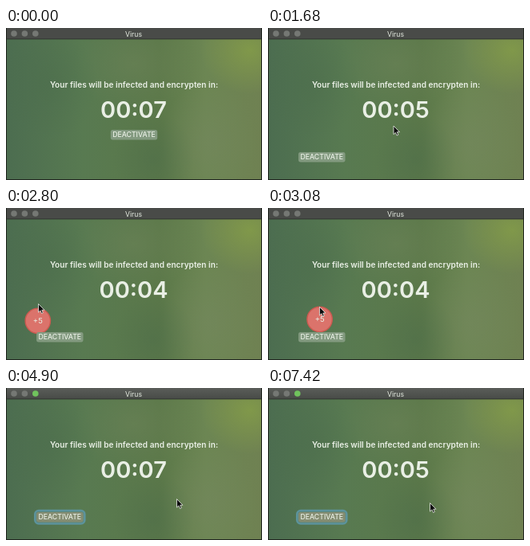
An HTML page that plays this animation: 320x191 px, repeating every 7.49 s.

```html
<!DOCTYPE html>
<html lang="en">
<head>
<meta charset="utf-8">
<title>Virus</title>
<style>
  html, body { margin: 0; width: 100%; height: 100%; overflow: hidden; background: #151a15; }
  svg { display: block; width: 100vw; height: 100vh; }
  text { font-family: Inter, "Open Sans", sans-serif; text-anchor: middle; fill: #e9efe5; }
</style>
</head>
<body>
<svg viewBox="0 0 320 191">
  <defs>
    <linearGradient id="base">
      <stop offset="0" stop-color="#4c6d50"/>
      <stop offset=".3" stop-color="#587a51"/>
      <stop offset=".6" stop-color="#5b7849"/>
      <stop offset=".78" stop-color="#6c8653"/>
      <stop offset="1" stop-color="#6f8152"/>
    </linearGradient>
    <linearGradient id="bar" x2="0" y2="1">
      <stop offset="0" stop-color="#5a5d59"/>
      <stop offset="1" stop-color="#484b47"/>
    </linearGradient>
    <radialGradient id="lime"><stop stop-color="#80984a"/><stop offset="1" stop-color="#80984a" stop-opacity="0"/></radialGradient>
    <radialGradient id="dark"><stop stop-color="#48694a"/><stop offset="1" stop-color="#48694a" stop-opacity="0"/></radialGradient>
    <radialGradient id="sage"><stop stop-color="#73875c"/><stop offset="1" stop-color="#73875c" stop-opacity="0"/></radialGradient>
  </defs>

  <rect width="320" height="191" fill="#20251f"/>
  <svg x="1" y="14" width="318" height="176" viewBox="1 14 318 176">
    <rect y="14" width="320" height="176" fill="url(#base)"/>
    <ellipse cx="305" cy="28" rx="62" ry="55" fill="url(#lime)"/>
    <ellipse cx="160" cy="45" rx="75" ry="60" fill="url(#sage)" opacity=".4"/>
    <ellipse cx="255" cy="145" rx="60" ry="80" fill="url(#sage)" opacity=".7"/>
    <ellipse cx="185" cy="165" rx="50" ry="60" fill="url(#dark)" opacity=".4"/>
    <ellipse cx="55" cy="70" rx="60" ry="70" fill="url(#dark)" opacity=".35"/>
  </svg>

  <rect id="titlebar" x="1" width="318" height="14"/>
  <rect x="1" y="13.5" width="318" height=".8" fill="#2b2e2a"/>
  <g id="dots"></g>
  <text id="title" x="159.5" y="10.6" font-size="8.6">Virus</text>

  <text x="160" y="74.6" font-size="10.1" font-weight="600">Your files will be infected and encrypten in:</text>
  <text id="clock" x="159.5" y="113" font-size="29" font-weight="600"></text>

  <g id="bubble">
    <circle r="15.7" fill="#db736b" stroke="#cb5a50" stroke-width="1.4"/>
    <text y="3.2" font-size="9.5" fill="#f0d6cf">+5</text>
  </g>

  <g id="button">
    <rect id="ring" x="-31" y="-8" width="62" height="16.5" rx="4.5" fill="#5f9299" fill-opacity=".5" stroke="#5c939c" stroke-width="2.6"/>
    <rect id="face" x="-29.2" y="-6" width="58.4" height="12.4" rx="2.6"/>
    <text y="3.2" font-size="8.7" font-weight="500">DEACTIVATE</text>
  </g>

  <path id="cursor" d="M0 0V10.6L2.4 8.4L4 12L5.8 11.2L4.3 7.7H7.5Z" fill="#0b0b0b" stroke="#eef0ec" stroke-width=".8" stroke-linejoin="round"/>
</svg>
<script>
const LOOP = 7490, STEP = 70, TICK = 1050, FIRST_TICK = 630;
const BUBBLE_IN = 2170, CLICK = 3220;
const $ = id => document.getElementById(id);

const clamp = v => Math.max(0, Math.min(1, v));
const easeOut = v => 1 - (1 - v) ** 2;
const smooth = v => v * v * (3 - 2 * v);
const progress = (t, start, end) => clamp((t - start) / (end - start));
const mix = (a, b, k) => a + (b - a) * k;

const place = (id, x, y) => $(id).setAttribute('transform', `translate(${x} ${y})`);
const paint = (el, color) => el.setAttribute('fill', color);

for (let i = 0; i < 3; i++) {
  $('dots').innerHTML += `<circle cx="${10 + 13.4 * i}" cy="7" r="3.8"/>`;
}

const moves = [
  { start: 420, end: 840, x: 160, y: 127 },
  { start: 1050, end: 1120, x: 157, y: 123 },
  { start: 2170, end: 2800, x: 40.5, y: 120.5 },
  { start: 2870, end: CLICK, x: 69, y: 125 },
  { start: 3850, end: 4130, x: 110, y: 156 },
  { start: 4130, end: 4480, x: 213.5, y: 139.5 },
  { start: 6650, end: 7420, x: 202.5, y: 144.5 }
];

function moveCursor(t) {
  let x = 340, y = 206;
  for (const m of moves) {
    const k = easeOut(progress(t, m.start, m.end));
    x = mix(x, m.x, k);
    y = mix(y, m.y, k);
  }
  place('cursor', x, y);
}

function drawWindow(focused) {
  paint($('titlebar'), focused ? 'url(#bar)' : '#494b48');
  paint($('title'), focused ? '#c3c6c1' : '#858882');
  [...$('dots').children].forEach((dot, i) => paint(dot, focused && i === 2 ? '#70c35d' : '#757874'));
  $('ring').style.display = focused ? '' : 'none';
  paint($('face'), focused ? '#858d72' : '#839a80');
}

function draw(t) {
  const ticks = Math.floor((t - FIRST_TICK) / TICK) + 1;
  const bonus = ticks > 3 ? 5 : 0;
  $('clock').textContent = '00:0' + (7 - ticks + bonus);

  drawWindow(t >= CLICK);

  const jump = smooth(progress(t, 630, 840));
  place('button', mix(160, 67.3, jump), mix(134, 162, jump));

  const drift = progress(t, BUBBLE_IN, CLICK);
  place('bubble', mix(-16, 77, drift), mix(146, 139, drift));
  $('bubble').style.opacity = t < BUBBLE_IN ? 0 : 1 - progress(t, CLICK, CLICK + 280);

  moveCursor(t);
}

function frame(now) {
  draw(Math.floor((now % LOOP) / STEP) * STEP);
  requestAnimationFrame(frame);
}
draw(0);
requestAnimationFrame(frame);
</script>
</body>
</html>
```
